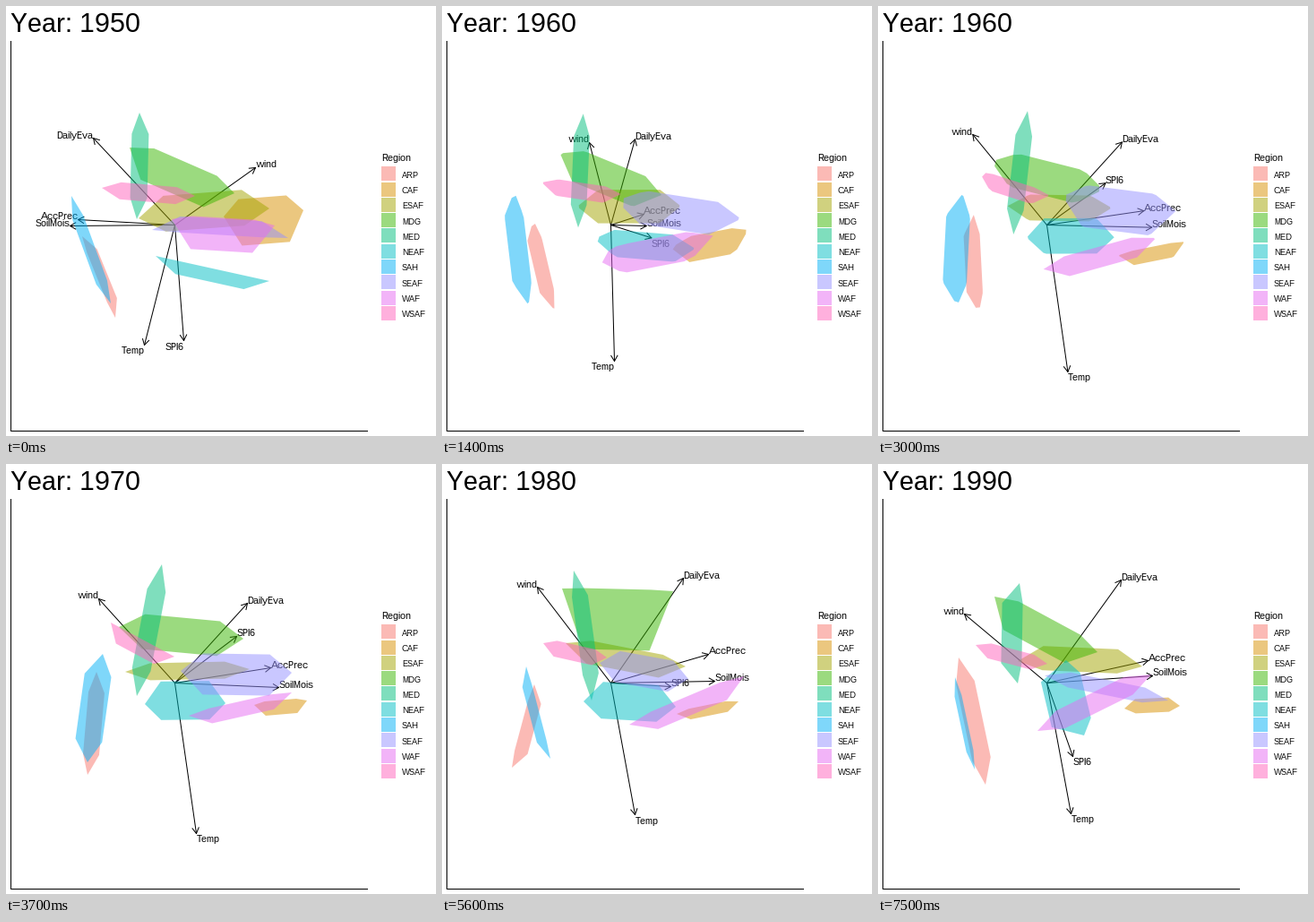
A matplotlib script for the animation above (8 s loop, 480 px wide and 480 px high).

```python
import numpy as np
import matplotlib.pyplot as plt
from matplotlib.animation import FuncAnimation
from matplotlib.patches import Polygon, Rectangle

SIZE = 480
FRAMES, INTERVAL = 80, 100
PERIOD, HOLD, MOVE = 19, 7, 12      # frames per decade, last still frame, steps of a move
ORIGIN = np.array([188.5, 244.5])
CENTER = (204, 256.5)               # labels are pushed outward from here
OUTLINE_POINTS = 60

plt.rcParams.update({
    "font.family": "Liberation Sans",
    "text.hinting": "native",
    "text.hinting_factor": 1,
    "text.kerning_factor": 6,       # plain advance widths
})

fig = plt.figure(figsize=(SIZE / 72, SIZE / 72), dpi=72, facecolor="white")
ax = fig.add_axes([0, 0, 1, 1])
ax.set(xlim=(0, SIZE), ylim=(SIZE, 0))
ax.axis("off")


def line(xs, ys):
    return ax.plot(xs, ys, color="black", lw=1, zorder=1)[0]


def label(x, y, text, size):
    return ax.text(x, y, text, fontsize=size, color="black", va="baseline", zorder=2)


def hull(x0, y0, x1, y1, left, right):
    """Six-cornered hull: a long axis, bulging by a given height on either side."""
    start, end = np.array([x0, y0]), np.array([x1, y1])
    axis = end - start
    normal = np.array([axis[1], -axis[0]]) / np.hypot(*axis)
    near, far = start + 0.2 * axis, start + 0.8 * axis
    return np.array([start, near + left * normal, far + left * normal,
                     end, far - right * normal, near - right * normal])


def resample(corners):
    """Evenly dense outline with a fixed number of points, corners kept."""
    edges = np.roll(corners, -1, axis=0) - corners
    length = np.hypot(*edges.T)
    stops = np.concatenate([[0], np.cumsum(length)])
    stops = np.round(stops / stops[-1] * OUTLINE_POINTS)
    closed = np.vstack([corners, corners[:1]])
    at = np.arange(OUTLINE_POINTS)
    return np.column_stack([np.interp(at, stops, closed[:, i]) for i in (0, 1)])


def align(start, end):
    """Both outlines, the first turned so that its points travel least."""
    a, b = resample(start), resample(end)
    turns = [np.roll(a, k, axis=0) for k in range(OUTLINE_POINTS)]
    return min(turns, key=lambda turn: ((turn - b) ** 2).sum()), b


class Region:
    def __init__(self, name, color, *hulls):
        self.hulls = [hull(*h) for h in hulls]
        self.moves = [align(a, b) for a, b in zip(self.hulls, self.hulls[1:])]
        self.patch = Polygon(self.hulls[0], facecolor=color, alpha=0.5, lw=0, zorder=3)
        ax.add_patch(self.patch)
        row = 17.28 * len(regions)
        ax.add_patch(Rectangle((419, round(179.3 + row)), 16, 16, lw=0,
                               facecolor=color, alpha=0.5))
        label(442, round(191.8 + row), name, 9)
        regions.append(self)

    def update(self, state, t):
        if t:
            a, b = self.moves[state]
            self.patch.set_xy(a + (b - a) * t)
        else:
            self.patch.set_xy(self.hulls[state])


class Arrow:
    def __init__(self, name, *tips):
        self.tips = np.array(tips) + 0.5
        self.shaft, self.head = line([], []), line([], [])
        self.text = label(0, 0, name, 11)
        arrows.append(self)

    def update(self, state, t):
        tip = self.tips[state]
        if t:
            tip = tip + (self.tips[state + 1] - tip) * t
        back = ORIGIN - tip
        angle = np.arctan2(back[1], back[0]) + np.radians([30, -30])
        wings = tip + 7.2 * np.column_stack([np.cos(angle), np.sin(angle)])
        self.shaft.set_data(*zip(ORIGIN, tip))
        self.head.set_data(*zip(wings[0], tip, wings[1]))
        x, y = tip
        self.text.set_ha("right" if x < CENTER[0] else "left")
        self.text.set_position((x, y if y < CENTER[1] else y + 10))


regions, arrows = [], []

# One hull per decade: axis start, axis end, the two bulges.
Region("ARP", "#F8766D", (85, 257, 122, 348, 10, 2), (111, 234, 127, 334, 2, 16),
       (101, 232, 91, 347, 11, 7), (103, 246, 78, 339, 13, 2), (90, 216, 120, 358, 12, 9))
Region("CAF", "#D89000", (243, 235, 332, 228, 18, 34), (262, 285, 346, 263, 1, 15),
       (277, 269, 336, 264, 3, 13), (262, 279, 331, 265, 3, 9), (275, 273, 337, 270, 10, 6))
Region("ESAF", "#A3A500", (148, 237, 294, 226, 23, 17), (153, 217, 253, 222, 16, 20),
       (133, 232, 272, 229, 9, 10), (138, 200, 272, 226, 8, 18), (156, 220, 295, 226, 18, 9))
Region("MDG", "#39B600", (138, 158, 255, 209, 10, 28), (129, 168, 240, 212, 14, 22),
       (126, 182, 265, 195, 17, 22), (134, 139, 258, 142, 1, 67), (130, 148, 245, 210, 8, 28))
Region("MED", "#00BF7D", (149, 119, 146, 238, 11, 8), (162, 121, 155, 252, 7, 10),
       (174, 112, 146, 259, 10, 11), (147, 119, 167, 264, 12, 6), (158, 133, 156, 245, 4, 19))
Region("NEAF", "#00BFC4", (167, 279, 294, 307, 0, 15), (174, 252, 277, 252, 19, 18),
       (155, 268, 245, 267, 25, 18), (158, 265, 261, 271, 23, 18), (210, 219, 230, 303, 12, 33))
Region("SAH", "#00B0F6", (73, 212, 117, 332, 5, 8), (85, 208, 86, 334, 7, 17),
       (108, 212, 91, 333, 13, 17), (94, 226, 121, 329, 1, 10), (86, 238, 108, 341, 3, 5))
Region("SEAF", "#9590FF", (163, 250, 315, 259, 17, 1), (216, 200, 342, 226, 13, 34),
       (195, 231, 319, 233, 20, 26), (176, 222, 275, 240, 17, 18), (186, 236, 324, 264, 9, 8))
Region("WAF", "#E76BF3", (185, 238, 300, 245, 5, 32), (171, 303, 304, 262, 11, 16),
       (204, 281, 319, 255, 3, 14), (209, 291, 337, 237, 4, 17), (178, 298, 305, 235, 11, 11))
Region("WSAF", "#FF62BC", (107, 203, 211, 212, 8, 11), (114, 194, 194, 209, 5, 13),
       (117, 177, 188, 215, 0, 18), (113, 200, 184, 216, 6, 12), (109, 202, 189, 223, 6, 11))

Arrow("wind", (278, 180), (107, 138), (103, 150), (106, 137), (96, 167))
Arrow("DailyEva", (97, 147), (274, 149), (269, 155), (269, 127), (271, 129))
Arrow("AccPrec", (80, 238), (297, 229), (295, 227), (297, 212), (301, 219))
Arrow("SoilMois", (71, 245), (306, 245), (304, 249), (304, 242), (306, 236))
Arrow("SPI6", (198, 373), (251, 201), (257, 192), (255, 248), (217, 326))
Arrow("Temp", (154, 378), (211, 405), (212, 412), (215, 391), (215, 390))

line([5.2, 5.2, 403], [39, 473.8, 473.8])
label(419, 173, "Region", 11)
title = label(5, 29, "", 30)


def update(frame):
    state, step = divmod(frame + 1, PERIOD)
    t = max(0, step - HOLD) / MOVE
    title.set_text(f"Year: {1950 + 10 * (state + (t >= 0.5))}")
    for item in regions + arrows:
        item.update(state, t)
    return []


anim = FuncAnimation(fig, update, frames=FRAMES, interval=INTERVAL, repeat=True)
plt.show()
```
